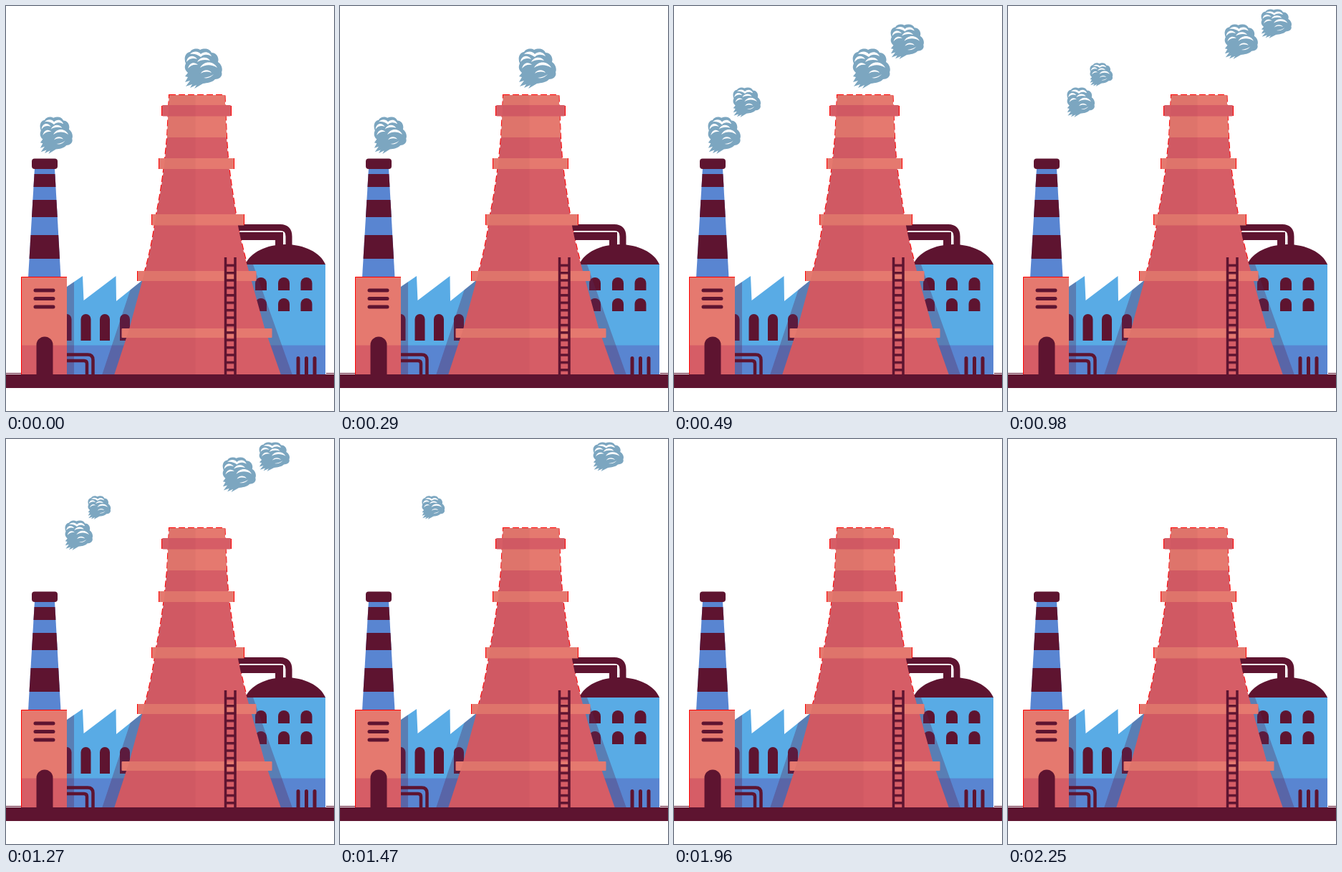
Recreate the animation shown at these times as an HTML page. Size 458x564 px, loop 2450 ms.

```html
<!DOCTYPE html>
<html lang="en">
<head>
<meta charset="utf-8">
<title>Factory</title>
<style>
  html, body { margin: 0; width: 100%; height: 100%; overflow: hidden; background: #fff; }
  svg { display: block; }
  .plum { fill: #5e1430; }
  .light { fill: #e5796f; }
  .coral { fill: #d65d66; }
  .sky { fill: #59abe5; }
  .blue { fill: #5985d1; }
  .shade { fill: #5a285a; opacity: .35; }
  .line { fill: none; stroke: #5e1430; stroke-width: 5; }
  .rim { fill: none; stroke: #f00; }
  .puff { animation: puff 2450ms step-end infinite; }
  .second { animation-delay: -1960ms; }
  .third { animation-delay: -1470ms; }
  @keyframes puff {
    0% { visibility: visible; }
    40%, 100% { visibility: hidden; }
  }
</style>
</head>
<body>
<svg width="458" height="564" viewBox="0 0 458 564">
  <defs>
    <symbol id="smoke" viewBox="0 0 54 56" preserveAspectRatio="none">
      <path fill="#7ca6c0" d="M2 21C-1 14 1 6 8 5C10 1 17-1 22 2C29-1 36 1 38 6C45 6 49 13 47 19C52 22 54 29 52 33C54 39 49 43 43 43C38 48 32 48 26 49L14 56L17 51L8 55L11 50L2 53L8 45L1 47L5 40L1 39L5 34C0 30 0 25 2 21Z"/>
      <g fill="#fff">
        <path d="M3 19C4 10 13 8 18 15C12 13 7 14 3 19Z"/>
        <path d="M8 8C13 3 20 4 23 8C28 3 36 5 38 11C32 8 27 8 23 12C18 8 13 7 8 8Z"/>
        <path d="M5 28C7 20 14 18 19 23C14 22 9 23 5 28Z"/>
        <path d="M18 19C22 11 32 11 36 17C29 15 23 16 18 19Z"/>
        <path d="M22 27C27 17 41 17 46 27C38 22 30 22 22 27Z"/>
        <path d="M23 35C26 29 35 29 38 34C33 32 28 32 23 35Z"/>
        <path d="M27 41Q35 43 41 36Q36 40 27 41Z"/>
      </g>
    </symbol>
    <path id="window" d="M0 18V8A8 8 0 0 1 16 8V18Z"/>
    <path id="tallWindow" d="M0 37V7A7 7 0 0 1 14 7V37Z"/>
    <path id="tower" d="M228 124H305.500L308 183L310 212C313 240 317 265 321 290C326 318 332 345 339 369L361.500 450L384 514H151L172 450L194 369C201 345 206 318 210 290C215 265 219 240 222 212L225 183Z"/>
    <pattern id="rungs" y="359.500" width="18" height="10.400" patternUnits="userSpaceOnUse">
      <path class="plum" d="M0 0H18V3.500H0Z"/>
    </pattern>
    <clipPath id="towerShape"><use href="#tower"/></clipPath>
    <clipPath id="stackShape"><path d="M40 226H68L76.500 378H31Z"/></clipPath>
    <clipPath id="hall"><path d="M85 391L107 376L108.500 410L153.500 376L154 411L194 379V514H85Z"/></clipPath>
  </defs>

  <use class="rim" href="#tower" stroke-width="2" stroke-dasharray="9 4"/>

  <!-- pipes and silo -->
  <path class="line" style="stroke-width:9" d="M322 308.500H383Q395 308.500 395 321V340"/>
  <path class="line" style="stroke-width:11" d="M322 320.500H381.500V340"/>
  <path class="sky" d="M335 359H446V514H335Z"/>
  <path class="blue" d="M335 472.500H446V514H335Z"/>
  <path class="plum" d="M334 360C341 343 364 332 390 332S439 343 446 360Z"/>
  <g class="plum">
    <use href="#window" x="348" y="378"/>
    <use href="#window" x="380" y="378"/>
    <use href="#window" x="411.500" y="378"/>
    <use href="#window" x="348" y="407"/>
    <use href="#window" x="380" y="407"/>
    <use href="#window" x="411.500" y="407"/>
  </g>
  <path class="line" style="stroke-linecap:round" d="M408 514V490.500M419.500 514V490.500M431 514V490.500"/>
  <path class="shade" d="M335 360H345L400 514H380Z"/>

  <!-- saw-roofed hall -->
  <g clip-path="url(#hall)">
    <path class="sky" d="M85 370H200V514H85Z"/>
    <path class="blue" d="M85 472.500H200V514H85Z"/>
    <g class="plum">
      <use href="#tallWindow" x="77.500" y="429"/>
      <use href="#tallWindow" x="104.500" y="429"/>
      <use href="#tallWindow" x="131" y="429"/>
      <use href="#tallWindow" x="159" y="429"/>
    </g>
    <path class="shade" d="M85 370H95V514H85ZM182 370L134 514H200V370Z"/>
  </g>
  <path class="line" style="stroke-width:4.500" d="M84 485.500H114Q121.500 485.500 121.500 493V514M84 494H109Q113 494 113 498V514"/>

  <!-- chimney and gatehouse -->
  <g clip-path="url(#stackShape)">
    <path class="blue" d="M30 226H78V378H30Z"/>
    <path class="plum" d="M30 234H78V252H30ZM30 270H78V294H30ZM30 319H78V352H30Z"/>
  </g>
  <rect class="plum" x="36" y="212.500" width="36" height="14.500" rx="4"/>
  <path class="light" d="M21 377H85V473H21Z"/>
  <path class="coral" d="M21 472.500H85V514H21Z"/>
  <path class="rim" d="M21.500 513V377.500H85"/>
  <path class="line" style="stroke-linecap:round" d="M41 396H66M41 407.500H66M41 419H66"/>
  <path class="plum" d="M42.500 514V472A11.500 11.500 0 0 1 65.500 472V514Z"/>

  <!-- cooling tower -->
  <g clip-path="url(#towerShape)">
    <path class="coral" d="M145 120H390V514H145Z"/>
    <path class="light" d="M220 120H315V183H220Z"/>
  </g>
  <rect class="coral" x="217.500" y="138" width="97" height="15.500" rx="2"/>
  <g class="light">
    <rect x="213.500" y="212" width="105" height="15" rx="1"/>
    <rect x="203.500" y="290" width="129" height="15.500" rx="1"/>
    <rect x="183.500" y="369" width="166" height="14" rx="1"/>
    <rect x="161.500" y="449" width="210" height="13" rx="1"/>
  </g>
  <path class="rim" d="M217.500 139V153M314.500 139V153M213.500 212V227M318.500 212V227M203.500 290V305M332.500 290V305M183.500 369V383"/>
  <path clip-path="url(#towerShape)" fill="#500020" opacity=".045" d="M145 120H264.500V514H145Z"/>

  <!-- ladder -->
  <path fill="url(#rungs)" d="M305 359H321V513H305Z"/>
  <path class="line" style="stroke-width:3.500" d="M306.500 350V514M320 350V514"/>

  <path class="plum" d="M0 513H458V532H0ZM0 511H21V512H0ZM447 511H458V512H447Z"/>

  <!-- smoke -->
  <use class="puff" href="#smoke" x="249" y="59" width="54" height="56"/>
  <use class="puff second" href="#smoke" x="302" y="25" width="48" height="49"/>
  <use class="puff third" href="#smoke" x="353" y="4" width="44" height="41"/>
  <use class="puff" href="#smoke" x="47" y="154" width="47" height="52"/>
  <use class="puff second" href="#smoke" x="82" y="113" width="40" height="42"/>
  <use class="puff third" href="#smoke" x="114" y="79" width="33" height="33"/>
</svg>
</body>
</html>
```
